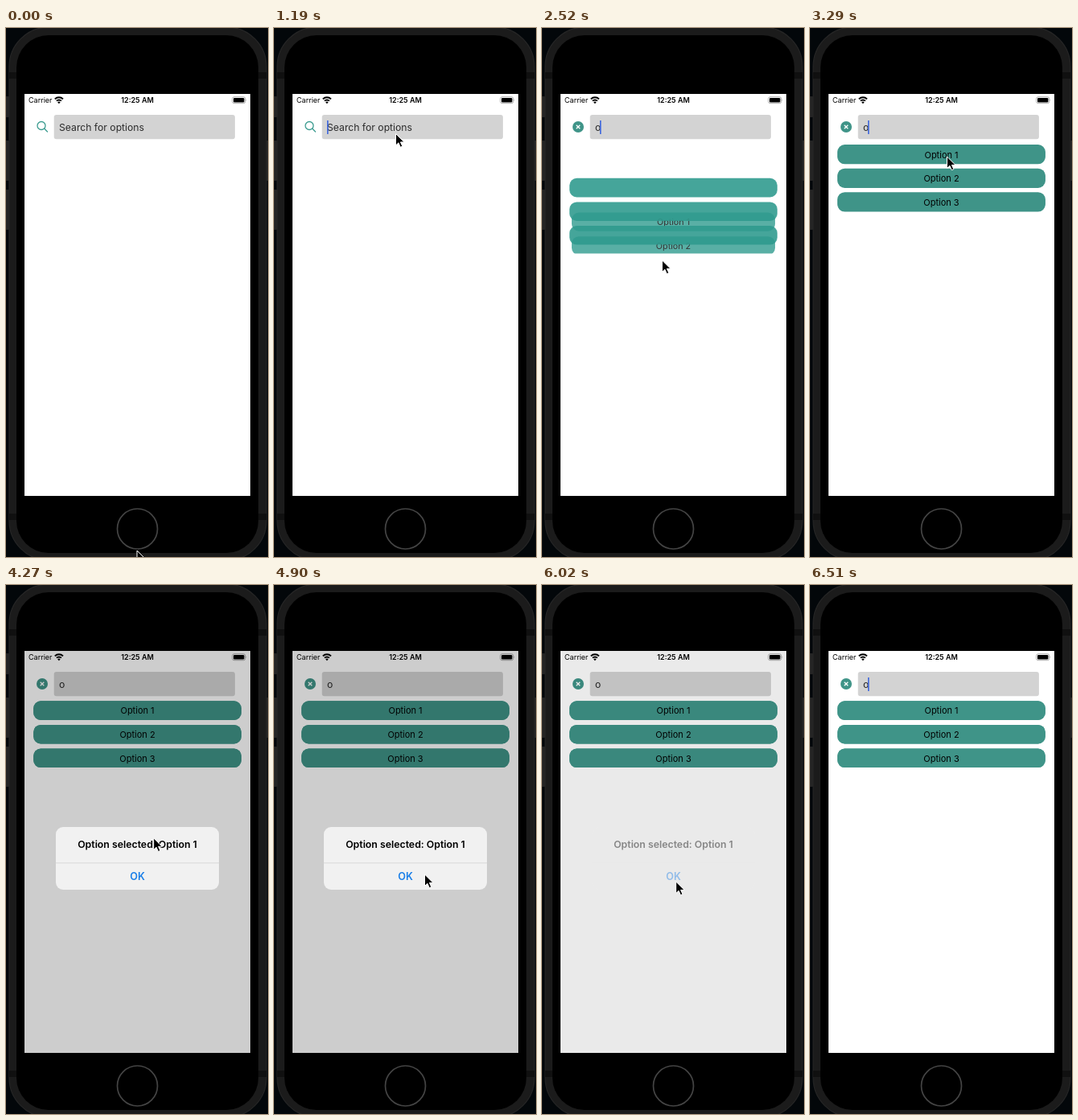
These frames come from a looping animation (326 by 658 pixels, 6860 ms). An HTML page:

```html
<!DOCTYPE html>
<html lang="en">
<head>
<meta charset="utf-8">
<title>Option search</title>
<style>
  html, body { margin: 0; width: 100%; height: 100%; overflow: hidden; background: #03070a; }
  svg { display: block; width: 326px; height: 658px; font-family: Inter, Roboto, sans-serif; }
  .mid { text-anchor: middle; }
  .bold { font-weight: 600; }
</style>
</head>
<body>
<svg viewBox="0 0 326 658">
  <defs>
    <clipPath id="screenClip"><rect x="23" y="82" width="281" height="500"/></clipPath>
    <clipPath id="listClip"><rect x="23" y="138" width="281" height="100"/></clipPath>
    <clipPath id="alertClip"><rect x="62" y="301" width="203" height="78" rx="9"/></clipPath>
  </defs>

  <!-- phone body -->
  <g fill="#242424">
    <rect x="-2" y="85" width="6" height="26" rx="1"/>
    <rect x="-2" y="140" width="6" height="50" rx="1"/>
    <rect x="-2" y="201" width="6" height="50" rx="1"/>
    <rect x="323" y="140" width="5" height="50" rx="1"/>
  </g>
  <rect x="4" y="-1" width="320" height="663" rx="49" fill="#1b1b1b" stroke="#262626" stroke-width="1.2"/>
  <g fill="#101010">
    <rect x="4" y="55" width="9" height="8"/><rect x="314" y="55" width="10" height="8"/>
    <rect x="4" y="604" width="9" height="8"/><rect x="314" y="604" width="10" height="8"/>
  </g>
  <rect x="13" y="9" width="301" height="644" rx="40"/>
  <circle cx="163.5" cy="623" r="25" fill="none" stroke="#444" stroke-width="1.7"/>

  <g clip-path="url(#screenClip)">
    <rect x="23" y="82" width="281" height="500" fill="#fff"/>

    <!-- search field -->
    <rect x="59.7" y="108" width="225.2" height="30.3" rx="3" fill="#d3d3d3"/>
    <text id="query" x="66" y="128" font-size="12.2" fill="#2c2c2c"></text>
    <rect id="caret" x="72" y="115" width="1.6" height="17" fill="#3d66dc"/>
    <g id="lens" fill="none" stroke="#3c9c90" stroke-width="1.3" stroke-linecap="round">
      <circle cx="44" cy="121.5" r="5"/><path d="M47.8 125.3l3.7 3.7"/>
    </g>
    <g id="clear">
      <circle cx="45" cy="123" r="7" fill="#3f9488"/>
      <path d="M42.7 120.7l4.6 4.6m0-4.6l-4.6 4.6" stroke="#fff" stroke-width="1.3"/>
    </g>

    <g id="list"><g id="rows" clip-path="url(#listClip)"></g></g>

    <!-- status bar -->
    <text x="28" y="93" font-size="9">Carrier</text>
    <g fill="none" stroke="#000" stroke-width="1.9">
      <path d="M60.8 88.4a7.2 7.2 0 0 1 10.2 0"/>
      <path d="M62.9 90.7a4.2 4.2 0 0 1 6 0"/>
    </g>
    <path d="M65.9 94.2l-1.8-1.9a2.6 2.6 0 0 1 3.6 0z"/>
    <text class="mid bold" x="163.5" y="93" font-size="9">12:25 AM</text>
    <rect x="281.7" y="85.7" width="16" height="8" rx="2.2" fill="#fff" stroke="#999" stroke-width=".8"/>
    <rect x="283" y="87" width="13.4" height="5.4" rx="1.2"/>
    <path d="M298.6 88.3q1.4 1.4 0 2.8z" fill="#999"/>

    <rect id="dim" x="23" y="82" width="281" height="500"/>
    <g id="alert">
      <g id="panel" clip-path="url(#alertClip)">
        <rect x="62" y="301" width="203" height="78" fill="#f1f1f1"/>
        <path d="M62 345.8h203" stroke="#d2d2d2" stroke-width=".8"/>
      </g>
      <g id="message" class="mid bold">
        <text x="163.5" y="327.3" font-size="12.3">Option selected: Option 1</text>
        <text x="163.5" y="367" font-size="12.6" fill="#1a7fe8">OK</text>
      </g>
    </g>
  </g>

  <path id="pointer" d="M0 0v14.5l3.4-3.2 2.4 5.4 2.5-1.1-2.4-5.2h4.6z"
        stroke="#fff" stroke-width="1" stroke-linejoin="round"/>
</svg>
<script>
const LOOP = 6860, STEP = 70;
const FOCUS = 840, TYPED = 1330, LIST_START = 1902, LIST_SHOWN = 2030;
const PRESS = 3430, ALERT_OPEN = 3920, ALERT_CLOSE = 5950, REFOCUS = 6510;
const TRAVEL = 400, STIFFNESS = 0.00617;
const REST_COLOR = [63, 148, 136], MOVING_COLOR = [42, 158, 146];

const POINTER_START = [163, 650];
const POINTER_MOVES = [
  { from: 70, to: 560, x: 151.5, y: 131.5 },
  { from: 2100, to: 2520, x: 149.5, y: 289 },
  { from: 2520, to: 3150, x: 170.5, y: 160 },
  { from: 3640, to: 4550, x: 187.5, y: 360 },
  { from: 4900, to: 5740, x: 166.7, y: 369 },
  { from: 6020, to: 6370, x: 165, y: 670 }
];

const $ = id => document.getElementById(id);
const progress = (t, from, to) => Math.min(1, Math.max(0, (t - from) / (to - from)));
const smooth = k => k * k * (3 - 2 * k);
const easeOut = k => 1 - (1 - k) ** 3;
const mix = (a, b, k) => a + (b - a) * k;
const fade = (node, value) => node.setAttribute('opacity', value);
const place = (node, value) => node.setAttribute('transform', value);

// Critically damped spring: distance still to go.
function springLeft(t) {
  const x = STIFFNESS * Math.max(0, t - LIST_START);
  return TRAVEL * (1 + x) * Math.exp(-x);
}

const bar = '<rect x="-129.3" y="-11.8" width="258.6" height="23.6" rx="9"/>';
$('rows').innerHTML = [0, 1, 2].map(i => `
  <g class="row" transform="translate(163.5 ${156.1 + i * 29.6})">
    ${bar}
    <g class="face">${bar}<text class="mid" y="4.3" font-size="11" fill="#000">Option ${i + 1}</text></g>
  </g>`).join('');
const rows = [...document.querySelectorAll('.row')];
const faces = [...document.querySelectorAll('.face')];

// Rows and the faces inside them run the same entrance, so its effect doubles on the faces.
function drawList(t) {
  const left = springLeft(t), shown = 1 - left / TRAVEL;
  const tint = Math.min(1, left / 60);
  const color = REST_COLOR.map((c, i) => Math.round(mix(c, MOVING_COLOR[i], tint)));
  const pressed = Math.sin(Math.PI * progress(t, PRESS, PRESS + 350));

  $('list').setAttribute('visibility', t < LIST_SHOWN ? 'hidden' : 'visible');
  $('list').setAttribute('fill', `rgb(${color})`);
  place($('list'), `translate(0 ${left})`);
  rows.forEach(row => fade(row, shown));
  faces.forEach((face, i) => {
    place(face, `translate(0 ${left}) scale(${0.8 + 0.2 * shown})`);
    fade(face, shown);
  });
  fade(rows[0], shown * (1 - 0.6 * pressed));
}

function drawSearch(t) {
  const typed = t >= TYPED, swap = progress(t, TYPED, TYPED + 420);
  const focused = t >= FOCUS && t < ALERT_OPEN || t >= REFOCUS;
  $('query').textContent = typed ? 'o' : 'Search for options';
  $('caret').setAttribute('x', typed ? 72 : 66);
  fade($('caret'), focused && t % 1000 < 880 ? 1 : 0);
  fade($('lens'), 1 - swap);
  fade($('clear'), swap);
}

function drawAlert(t) {
  const opened = easeOut(progress(t, ALERT_OPEN, ALERT_OPEN + 350));
  const shown = opened * (1 - easeOut(progress(t, ALERT_CLOSE, ALERT_CLOSE + 280)));
  fade($('dim'), 0.197 * shown);
  fade($('panel'), shown ** 3);
  fade($('message'), shown);
  place($('alert'), `translate(163.5 340) scale(${mix(1.18, 1, opened)}) translate(-163.5 -340)`);
}

function drawPointer(t) {
  let [x, y] = POINTER_START;
  for (const move of POINTER_MOVES) {
    const k = smooth(progress(t, move.from, move.to));
    x = mix(x, move.x, k);
    y = mix(y, move.y, k);
  }
  place($('pointer'), `translate(${x} ${y})`);
}

const start = performance.now();
function tick() {
  const now = (performance.now() - start) % LOOP;
  const t = Math.floor(now / STEP) * STEP;
  [drawSearch, drawList, drawAlert, drawPointer].forEach(draw => draw(t));
  requestAnimationFrame(tick);
}
tick();
</script>
</body>
</html>
```
